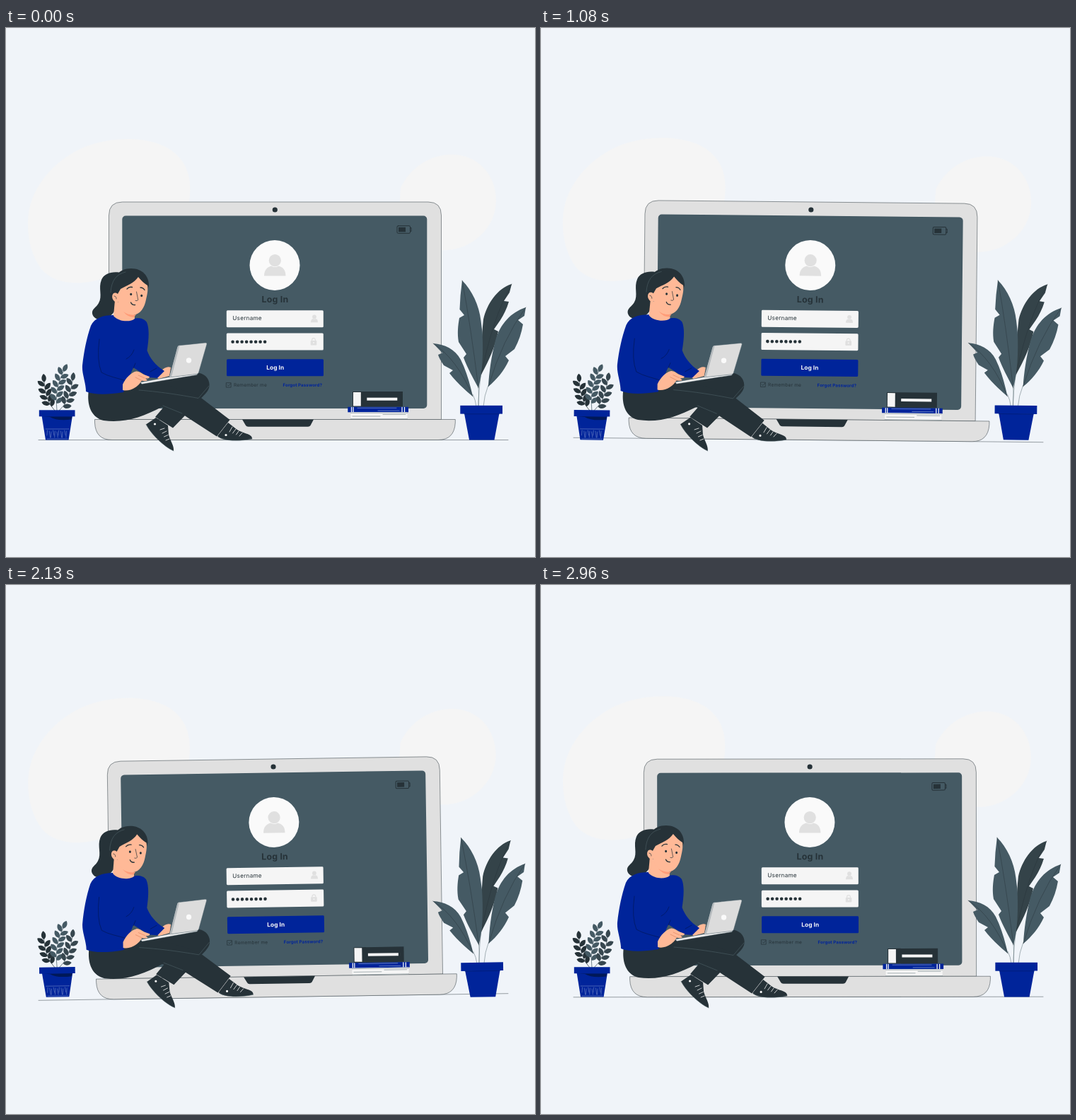
Write an HTML page that moves like this. It is 748 by 748 pixels and loops after 3 s.

```html
<!DOCTYPE html>
<html lang="en">
<head>
<meta charset="utf-8">
<title>Log in</title>
<style>
  html, body { margin: 0; width: 100%; height: 100%; overflow: hidden; background: #f0f4f9; }
  svg { display: block; width: 100vw; height: 100vh; }
  text { font-family: Inter, "Open Sans", sans-serif; text-rendering: geometricPrecision; }
  .ink { fill: #263238; }
  .slate { fill: #455a64; }
  .blue { fill: #00249a; }
  .grey { fill: #e0e0e0; }
  .pale { fill: #f5f5f5; }
  .skin { fill: #ffb997; }
  .line, .light { fill: none; stroke: var(--c, #263238); stroke-width: var(--w, .7); stroke-linecap: round; stroke-linejoin: round; }
  .light { stroke: var(--c, #f5f5f5); }
  .edge { stroke: #263238; stroke-width: .5; }
  .fold { --c: #001858; }
  .rib { --c: #55686f; --w: .5; }
  .thin { --w: .45; }
  .bold { font-weight: 700; }
</style>
</head>
<body>
<svg viewBox="0 0 748 748" xmlns="http://www.w3.org/2000/svg">
  <g class="sway pale" data-pivot="362 260">
    <path d="M31 272C33 225 70 185 112 168C160 150 215 155 240 178C258 195 263 215 259 246C250 300 200 340 150 350C110 366 70 364 50 341C36 322 30 297 31 272Z"/>
    <path d="M558 226C572 196 600 180 628 179C666 178 693 206 693 245C692 283 660 311 625 314C590 317 560 292 556 255Z"/>
  </g>

  <g class="sway" data-pivot="378 582.5">
    <path class="line thin" d="M46 582.5H710"/>
  </g>

  <g class="sway" data-pivot="380 414">
    <path class="grey edge" d="M145.5 553.5V265Q145.5 246 164.5 246H597Q615.5 246 615.5 265V553.5Z"/>
    <rect class="slate" x="164.3" y="265.5" width="431" height="272.5" rx="5"/>
    <circle class="ink" cx="380.3" cy="257" r="3.6"/>
    <path class="grey edge" d="M125.5 553.5H635.3V558Q634 582.5 611 582.5H150Q126.5 582.5 125.5 558Z"/>
    <path class="ink" d="M334 553.5H435L430.5 562Q429.5 563.7 427 563.7H342.5Q340 563.7 339 562Z"/>

    <g class="line" style="--w:1">
      <rect x="553" y="279.7" width="18.5" height="10.6" rx="1.5"/>
      <path d="M571.5 282.5H573V287.5H571.5"/>
    </g>
    <rect class="ink" x="555" y="281.8" width="10" height="6.5"/>

    <circle cx="380" cy="335.5" r="35.5" fill="#fafafa"/>
    <g class="grey">
      <circle cx="380.3" cy="328.7" r="8.6"/>
      <path d="M365 350.5C365 342 369.5 338 375 336.5Q380.3 339.5 385.5 336.5C391.5 338 395.5 342 395.5 350.5Z"/>
    </g>
    <text class="ink bold" x="380.5" y="388.3" font-size="12.4" letter-spacing=".2" text-anchor="middle">Log In</text>

    <rect class="pale" x="311.8" y="399.3" width="137" height="24" rx="1.5"/>
    <rect class="pale" x="311.8" y="431.6" width="137" height="24" rx="1.5"/>
    <rect class="blue" x="312" y="468.3" width="137" height="24" rx="1.5"/>
    <text class="ink" x="320.3" y="413.3" font-size="8.2" letter-spacing=".22">Username</text>
    <g class="grey">
      <circle cx="436" cy="408.3" r="2.9"/>
      <path d="M431 416.3C431 412.5 433 411.3 434.3 411Q436 412 437.7 411C439.5 411.3 441 412.5 441 416.3Z"/>
      <rect x="430.7" y="442" width="8.6" height="6.5" rx=".8"/>
      <path d="M432.6 442.5V441A2.4 2.4 0 0 1 437.4 441V442.5" fill="none" stroke="#e0e0e0" stroke-width="1.2"/>
    </g>
    <circle cx="435" cy="445" r="1" fill="#f5f5f5"/>
    <g id="dots" class="ink"></g>
    <text class="bold" x="380.7" y="483.2" font-size="8.3" letter-spacing=".08" fill="#fafafa" text-anchor="middle">Log In</text>
    <rect class="line" x="311.7" y="501.7" width="6.4" height="6.4"/>
    <path class="line" d="M313.2 504.7L314.6 506.2L317.6 502.8"/>
    <text class="ink" x="322" y="507.2" font-size="6.5" letter-spacing=".22">Remember me</text>
    <text class="blue bold" x="391.5" y="507.2" font-size="6.2" letter-spacing=".08">Forgot Password?</text>

    <rect class="ink" x="490" y="514" width="71" height="21.5"/>
    <rect class="pale" x="491" y="515" width="10.8" height="19.5"/>
    <rect class="pale" x="510.3" y="522.7" width="43" height="4"/>
    <rect class="blue" x="483.3" y="535.8" width="85.7" height="7.5"/>
    <path class="light" d="M488.5 536.5V542.7M491 536.5V542.7M560 536.5V542.7M563.5 536.5V542.7" style="--w:1.3"/>
    <path class="light" d="M497 537.3H552M526 541H556" style="--w:.4"/>
    <rect class="pale" x="487.5" y="543.3" width="80" height="9.7"/>
    <path class="line rib" d="M487.5 544.3H567.5M490 549H529M533 546.5H565M487.5 552.7H567.5"/>
  </g>

  <g class="sway" data-pivot="73 528">
    <g id="twigs"></g>
    <path class="blue" d="M50.5 548H94L88.5 582.5H56Z"/>
    <path d="M52 549.3H93.3L92.5 553.5Q72 556 62 550Z" fill="#001858"/>
    <rect class="blue" x="46.8" y="540.3" width="50.7" height="9"/>
    <path id="scribble" class="light" style="--c:#8c9bd0;--w:.5"/>
  </g>

  <g class="sway" data-pivot="669 469">
    <path class="line rib" d="M668 505Q669 520 668 535M682 505Q676 520 675 535M672 486Q668 515 668 535M660 518Q664 526 665 535"/>
    <path d="M715 362C695 368 680 390 675 412C672 440 672 465 672 490C683 470 692 450 696 429L690 426L699 413C704 405 708 397 711 387L704 386L712 374Z" fill="#344349"/>
    <path class="slate" d="M645 357C659 371 669 392 671.5 414L673.5 430C675 458 674 488 668 509C660 494 652 480 647 466L651 461L640 444C638 432 639 421 641 410L648 406L641.5 398Q642 378 645 357Z"/>
    <path class="slate" d="M735 395C714 402 699 418 692 442C686 465 683 488 682 507C694 497 704 485 711 470L706 464L719 454C725 443 729 431 731 419L724 413L733 407Z"/>
    <path class="slate" d="M604 446C620 447 635 454 643 469C651 485 656 503 660 521C648 511 636 500 627 488L632 484L619 477C615 471 612 466 611 462L617 459.5Z"/>
    <path class="line thin" d="M645 357Q657 420 668 509M735 395Q702 440 682 507M604 446Q638 468 660 521M715 362Q688 410 672 490"/>
    <path class="blue" d="M648 545H697.5L690.5 582.5H655Z"/>
    <rect class="blue" x="642.3" y="533.8" width="59.7" height="11.8"/>
    <path class="line fold thin" d="M648 545.8H697"/>
  </g>

  <g class="sway" data-pivot="228 469">
    <path class="ink" d="M166 347C153 343 139 346 135 356C130 368 137 379 131 389C128 395 121 397 122 404C124 412 133 414 141 411C152 407 160 393 160 376Z"/>

    <path class="ink" d="M188 503C215 496 243 491 265 487C282 486 290 498 287 509C284 519 271 525 254 547L236 565.5L211 550L229 529L180 520Z"/>
    <path class="ink" d="M212 551L198 560.5C205 574 223 592 237 598C238 591 232 583 230 575L229 562Z"/>
    <path class="line rib" d="M198 560.5C205 574 223 592 237 598"/>
    <path class="light" d="M221 573L227 570M223.5 578L229 575.5M226 583L231 581M218 568L224 566" style="--w:.8"/>
    <circle cx="210.5" cy="560" r="1.6" fill="#fafafa"/>

    <path class="ink" d="M117 511C114 531 119 550 138 555C168 559 193 550 220 536L248 545L298 577.5L316.5 554L272 520C240 508 215 500 188 503L150 512Z"/>
    <path class="line rib" d="M188 512C225 515 252 520 272 523.5L287 506M249 545L222 534"/>
    <path class="ink" d="M314 558L299 577C305 584 328 585 348 581C349 573 333 574 323 565Z"/>
    <path class="line rib" d="M300 578C309 584 328 585 348 581"/>
    <path class="light" d="M316 571L320 564M320.5 573L325 567M325.5 575L329 570M330 577L334 572.5" style="--w:.8"/>
    <circle cx="311" cy="575.5" r="1.6" fill="#fafafa"/>

    <path class="skin" d="M212 494L219 485C224 480 229 478 233 480L231 492L216 496Z"/>
    <path class="blue" d="M152 406C137 406 125 410 120 421C114 438 110 458 108 477C107 489 113 501 113 514Q130 521 166 515L172 499L180 480L202 494L214 495L224 485C211 477 203 466 199.5 456C202 440 203 425 199 416C194 409 185 410 180 411Z"/>
    <path class="line fold" d="M181 455Q178 464 170 468M132 440Q128 470 135 487C145 493 158 495 170 499M183 474L180 481M204 486L213 481"/>

    <path class="skin" d="M154 385L152 407C159 416 177 416 182 411L181 400Z"/>
    <path d="M166 401Q174 407 184 405L181 409Q172 409 166 401Z" fill="#ff9c78"/>
    <path class="ink" d="M150 377C148 353 159 340 177 340C193 340 202 351 202 364L200 371L165 385Z"/>
    <path class="skin" d="M187 352C181 361 171 364 162 369L158 376C151 371 148 380 152 385C154 388 157 388 159 387C160 397 168 405 180 405.5C190 405 196 395 198 384C200 376 201 369 200 364C195 361 191 357 187 352Z"/>
    <g class="ink">
      <ellipse cx="176.7" cy="376.5" rx="1.5" ry="1.8"/>
      <ellipse cx="191.7" cy="378.5" rx="1.5" ry="1.8"/>
    </g>
    <path class="line" d="M171 369Q174 365.5 178.5 366.5M190 367Q194 367 196 370.5M176.5 388Q178 392 182.5 391.5" style="--w:1.3"/>
    <path class="line" d="M184.5 373L186.800 384.500Q185.500 386.500 183 385.500M153 379Q156 379 156 383"/>
    <path class="line rib" d="M148 374C149 357 156 348 169 345"/>

    <path d="M190 501L231 493.5L271 488.5L270 490.5L192 503.5Z" fill="#f0f0f0" stroke="#455a64" stroke-width=".4"/>
    <path d="M231 494L242.5 451Q243 449 245 448.8L282 445Q284.5 445 284 447L272.5 487Q272 489 270 489.3Z" fill="#dcdcdc" stroke="#455a64" stroke-width=".5"/>
    <path d="M231 494L242.5 451Q243 449 245.5 448.8L234 493.5Z" fill="#b5babd"/>
    <circle cx="258.5" cy="470" r="3.7" fill="#fafafa"/>
    <path class="skin" d="M165 504C169 495 177 487 184 485.5C188 485 191 488 195 490L203 493Q203 496 197 495.5L200 498Q198 500 192 498.5L188 504C181 511 172 514 165 512Z"/>
    <path class="line" d="M187 491L196 495M183 494L192 498.5" style="--c:#d9805d;--w:.6"/>
  </g>
</svg>
<script>
  const PERIOD = 3000, STEP = 1000 / 24;
  const $ = id => document.getElementById(id);

  function add(parent, tag, attrs) {
    const el = document.createElementNS("http://www.w3.org/2000/svg", tag);
    for (const key in attrs) el.setAttribute(key, attrs[key]);
    parent.append(el);
  }

  for (let i = 0; i < 8; i++)
    add($("dots"), "circle", { cx: 320.6 + i * 6.5, cy: 443.7, r: 2.3 });

  // A curved stem with alternating leaves and one at the tip.
  function twig([x0, y0], [cx, cy], [x1, y1], color, leaves) {
    const host = $("twigs");
    add(host, "path", { d: `M${x0} ${y0}Q${cx} ${cy} ${x1} ${y1}`, fill: "none", stroke: color, "stroke-width": .7 });
    for (let i = 1; i <= leaves; i++) {
      const u = .1 + .9 * i / leaves, v = 1 - u;
      const x = v * v * x0 + 2 * u * v * cx + u * u * x1;
      const y = v * v * y0 + 2 * u * v * cy + u * u * y1;
      const dx = v * (cx - x0) + u * (x1 - cx), dy = v * (cy - y0) + u * (y1 - cy);
      const lean = Math.atan2(dx, -dy) * 180 / Math.PI;
      const turn = i === leaves ? lean : lean + (i % 2 ? 48 : -48);
      add(host, "path", {
        d: "M0 0C-4.5 -3 -4 -9 0 -12C4 -9 4.5 -3 0 0Z",
        fill: color, transform: `translate(${x} ${y}) rotate(${turn})`
      });
    }
  }
  twig([69, 541], [56, 528], [54, 501], "#263238", 9);
  twig([72, 541], [68, 512], [81, 486], "#455a64", 11);
  twig([75, 541], [90, 528], [94, 499], "#37474f", 9);

  let marks = "M56 567H89M58 581H87";
  for (let i = 0; i < 11; i++)
    marks += `M${58.5 + i * 2.7} ${569 + i % 3}l${i % 2 ? 1.3 : -.6} ${7 + i * 5 % 3}`;
  $("scribble").setAttribute("d", marks);

  const parts = [...document.querySelectorAll(".sway")];
  const start = performance.now();

  function draw() {
    const t = (performance.now() - start) % PERIOD;
    // The picture advances 24 times a second, on a 10 ms clock.
    const tick = Math.floor((Math.floor(t / 10) * 10 + 4.99) / STEP);
    const p = tick * STEP / PERIOD;
    const angle = p < .25 ? 4 * p : p < .75 ? 2 - 4 * p : 4 * p - 4;
    for (const part of parts)
      part.setAttribute("transform", `rotate(${angle} ${part.dataset.pivot})`);
    requestAnimationFrame(draw);
  }
  draw();
</script>
</body>
</html>
```
